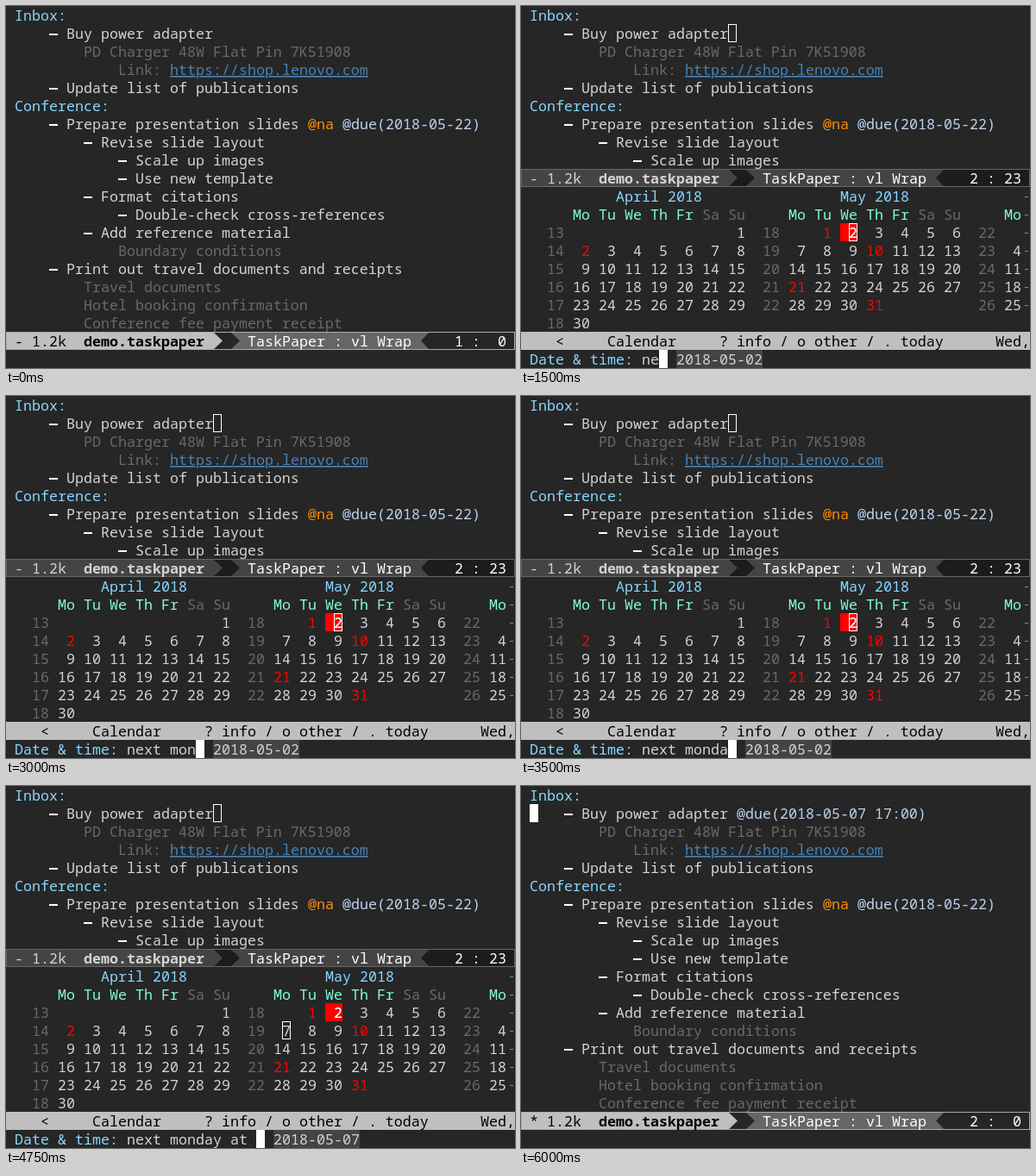
An HTML page for the animation above (6.25 s loop, 590 by 420 pixels).

```html
<!DOCTYPE html>
<html lang="en">
<head>
<meta charset="utf-8">
<title>Setting a due date</title>
<style>
  html, body { margin: 0; width: 100%; height: 100%; overflow: hidden; background: #262626; }
  svg { display: block; width: 590px; height: 420px; }
  text { font: 16.667px "Noto Sans Mono", "DejaVu Sans Mono", monospace; white-space: pre; fill: #d3d3d3; }
  .head { fill: #87d7ff; }
  .note { fill: #696969; }
  .link { fill: #4682b4; text-decoration: underline; }
  .next { fill: #ff8c00; }
  .due { fill: #bcd2ee; }
  .day { fill: #7fffd4; }
  .red { fill: #ff0000; }
  .ink { fill: #000; }
  .dash { fill: #fff; font-weight: bold; transform: translateY(-1px); }
  .bold { font-weight: bold; }
  .white { fill: #fff; }
</style>
</head>
<body>
<svg id="stage" viewBox="0 0 590 420"></svg>
<script>
const CELL = 10, ROW = 21, LOOP = 6250, STEP = 250;
const OPEN = 4, CLOSE = 23;             // steps at which the calendar shows and hides
const TYPED = "next monday at 5pm";

const esc = s => s.replace(/&/g, "&amp;").replace(/</g, "&lt;");
const text = (col, row, s, cls = "") =>
  `<text x="${10 + col * CELL}" y="${row * ROW + 17}" class="${cls}">${esc(s)}</text>`;
const rect = (x, y, w, h, fill, extra = "") =>
  `<rect x="${x}" y="${y}" width="${w}" height="${h}" fill="${fill}" ${extra}/>`;
const block = (col, row) => rect(10 + col * CELL, row * ROW, CELL, ROW, "#fff");
const hollow = (col, row) =>
  rect(10.5 + col * CELL, row * ROW + .5, CELL - 1, ROW - 1, "none", 'stroke="#fff"');
const item = (col, row, s) => text(col, row, "—", "dash") + text(col + 2, row, s);

function outline() {
  return text(0, 0, "Inbox:", "head") +
    item(4, 1, "Buy power adapter") +
    text(8, 2, "PD Charger 48W Flat Pin 7K51908", "note") +
    text(12, 3, "Link:", "note") + text(18, 3, "https://shop.lenovo.com", "link") +
    item(4, 4, "Update list of publications") +
    text(0, 5, "Conference:", "head") +
    item(4, 6, "Prepare presentation slides") +
    text(34, 6, "@na", "next") + text(38, 6, "@due(2018-05-22)", "due") +
    item(8, 7, "Revise slide layout") +
    item(12, 8, "Scale up images") +
    item(12, 9, "Use new template") +
    item(8, 10, "Format citations") +
    item(12, 11, "Double-check cross-references") +
    item(8, 12, "Add reference material") +
    text(12, 13, "Boundary conditions", "note") +
    item(4, 14, "Print out travel documents and receipts") +
    text(8, 15, "Travel documents", "note") +
    text(8, 16, "Hotel booking confirmation", "note") +
    text(8, 17, "Conference fee payment receipt", "note");
}

function modeLine(row, active, flag, pos) {
  const y = row * ROW, mid = y + ROW / 2, end = y + ROW;
  const [left, gap, body, edge] = active
    ? ["#bfbfbf", "#262626", "#666", "#aaa"]
    : ["#444", "#1c1c1c", "#444", "#666"];
  const arrow = (x, fill) =>
    `<path d="M0 ${y}H${x}L${x + 11} ${mid}L${x} ${end}H0Z" fill="${fill}"/>`;
  const ink = active ? "ink" : "";
  return rect(0, y, 590, ROW, body) + arrow(260, gap) + arrow(240, left) +
    `<path d="M590 ${y}H491L481 ${mid}L491 ${end}H590Z" fill="${gap}"/>` +
    rect(.5, y + .5, 589, ROW - 1, "none", `stroke="${edge}"`) +
    text(0, row, flag, ink) + text(2, row, "1.2k", ink) +
    text(8, row, "demo.taskpaper", "bold " + ink) +
    text(27, row, "TaskPaper : vl Wrap", "white") + text(51, row, pos, "white");
}

// first: weekday of day 1 (Monday = 0); col: column of the Monday cells
function month(col, title, first, days, week, marked) {
  let out = title ? text(title.col, 10, title.s, "head") : "";
  const fits = c => c < 57;
  "Mo Tu We Th Fr Sa Su".split(" ").forEach((d, i) => {
    if (fits(col + i * 3)) out += text(col + i * 3, 11, d, i > 4 ? "note" : "day");
  });
  const rows = Math.ceil((first + days) / 7);
  for (let r = 0; r < rows; r++) out += text(col - 3, 12 + r, String(week + r), "note");
  for (let d = 1; d <= days; d++) {
    const n = first + d - 1, c = col + n % 7 * 3;
    if (fits(c)) out += text(c, 12 + Math.floor(n / 7), String(d).padStart(2),
                             marked.includes(d) ? "red" : "");
  }
  return out;
}

function calendar() {
  let out = rect(0, 9 * ROW, 590, 231, "#262626") + modeLine(9, false, "-", "2 : 23") +
    hollow(23, 1) + rect(370, 12 * ROW, 20, ROW, "#f00") +
    month(5, { col: 10, s: "April 2018" }, 6, 30, 13, [2]) +
    month(30, { col: 36, s: "May 2018" }, 1, 31, 18, [1, 10, 21, 31]) +
    month(55, null, 4, 28, 22, []) +
    text(37, 12, "2", "white");
  for (let r = 10; r < 17; r++) out += rect(584, r * ROW + 11, 4, 1, "#8a8a8a");
  return out + rect(0, 18 * ROW, 590, ROW, "#bfbfbf") +
    text(3, 18, "<", "ink") + text(9, 18, "Calendar", "ink") +
    text(22, 18, "? info / o other / . today", "ink") + text(54, 18, "Wed,", "ink");
}

function prompt(n) {
  const done = n === TYPED.length, end = 13 + n;
  const date = n < 11 ? "2018-05-02" : "2018-05-07" + (done ? " 17:00" : "");
  return hollow(n < 11 ? 37 : 31, n < 11 ? 12 : 13) +
    text(0, 19, "Date & time:", "head") + text(13, 19, TYPED.slice(0, n)) +
    rect(30 + end * CELL, 19 * ROW, date.length * CELL, ROW, "#444") +
    text(end + 2, 19, date) +
    block(done ? 0 : end, 19) + (done ? text(0, 19, "D", "ink") : "");
}

const LIST = outline(), CALENDAR = calendar();

function scene(step) {
  if (step >= OPEN && step < CLOSE) return LIST + CALENDAR + prompt(step - OPEN);
  if (step >= CLOSE)
    return LIST + text(24, 1, "@due(2018-05-07 17:00)", "due") + block(0, 1) +
      modeLine(18, true, "*", "2 :  0");
  const pos = ["1 :  0", "2 :  0", "2 : 23"][Math.min(step, 2)];
  return LIST + modeLine(18, true, "-", pos) + (step ? block(step > 1 ? 23 : 0, 1) : "");
}

const stage = document.getElementById("stage");
let shown = -1;
function tick() {
  const step = Math.floor(performance.now() % LOOP / STEP);
  if (step !== shown) stage.innerHTML = scene(shown = step);
  requestAnimationFrame(tick);
}
tick();
</script>
</body>
</html>
```
